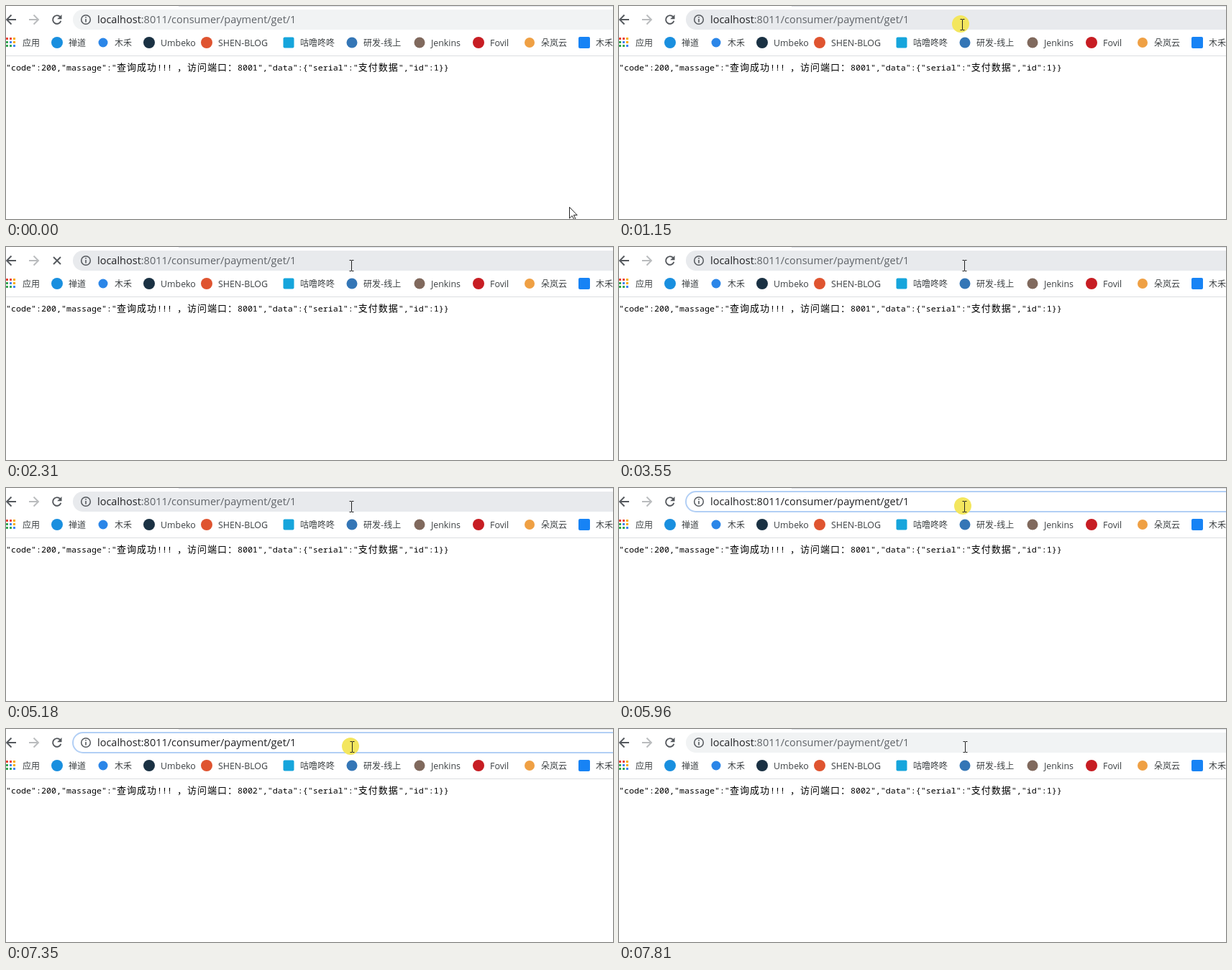
These frames come from a looping animation (844x297 px, 8 s). An HTML page:

```html
<!DOCTYPE html>
<html lang="zh-CN">
<head>
<meta charset="utf-8">
<style>
html, body { margin: 0; width: 844px; height: 297px; overflow: hidden; background: #fff; }
svg { display: block; }
text { white-space: pre; }
#url { font: 14.5px "Open Sans", "Noto Sans", sans-serif; fill: #202124; }
#marks text { font: 12px "Noto Sans CJK SC", "Noto Sans CJK", sans-serif; fill: #3c4043; }
#marks text.latin { font: 12.4px "Open Sans", "Noto Sans", sans-serif; }
#json { font: 11.667px "Noto Sans Mono", "Liberation Mono", monospace; }
#json .han { font: 13px "Noto Sans CJK SC", "Noto Sans CJK", sans-serif; letter-spacing: 1px; }
.line { fill: none; stroke: #54585d; stroke-width: 1.9; }
</style>
</head>
<body>
<svg width="844" height="297" viewBox="0 0 844 297">
  <rect x="240" width="604" height="1" fill="#dee1e6"/>
  <path class="line" d="M14 19H1M7.5 12.5L1 19l6.5 6.5"/>
  <path class="line" d="M32 19h13M38.500 12.500L45 19l-6.500 6.500" style="stroke:#babcbe"/>
  <g id="reload">
    <path class="line" d="M75.300 15.200A5.800 5.800 0 1 0 76.400 20.800"/>
    <path d="M77.500 12v6.300h-6.300z" fill="#54585d"/>
  </g>
  <path id="stop" class="line" d="M66 14l10 10M76 14l-10 10"/>

  <rect id="pill" x="93" y="5" width="780" height="28" rx="14" stroke-width="2"/>
  <circle class="line" cx="111" cy="19" r="6.300" style="stroke-width:1.500"/>
  <path d="M110.200 15h1.600v1.600h-1.600zM110.200 18h1.600v4.500h-1.600z" fill="#54585d"/>
  <rect id="selection" x="127" y="10" width="276" height="19" fill="#a8cbf8"/>
  <text id="url" x="127" y="24">localhost<tspan id="path">:8011/consumer/payment/get/1</tspan></text>

  <g id="marks"></g>
  <rect y="69" width="844" height="1" fill="#dcdee1"/>
  <text id="json" x="0" y="90">"code":200,"massage":"<tspan class="han">查询成功</tspan>!!! <tspan class="han">，访问端口：</tspan><tspan id="port">8001</tspan>","data":{"serial":"<tspan class="han">支付数据</tspan>","id":1}}</text>

  <circle id="press" r="12" fill="#f3e65e"/>
  <path id="arrow" d="M.5.500v15.500l3.700-3.500 2.600 5.200 2.100-1-2.500-5.100h4.800z" fill="#fff" stroke="#222"/>
  <path id="beam" d="M-3 -7.500h2.500l.5.500.500-.500H3M0 -7V7M-3 7.500h2.500l.5-.500.500.500H3" fill="none" stroke="#222"/>
</svg>
<script>
const LOOP = 8000;
const $ = id => document.getElementById(id);
const show = (id, on) => $(id).style.display = on ? '' : 'none';
const move = (id, x, y) => $(id).setAttribute('transform', `translate(${x} ${y})`);
const within = (t, spans) => spans.some(([a, b]) => t >= a && t < b);
const latest = (t, list) => list.filter(k => k[0] <= t).pop();

// Bookmarks: icon centre, half size, colour, label, square icon
const marks = [
  [71, 8, '#198fdf', '禅道'],
  [135, 6.5, '#2b86e8', '木禾'],
  [199, 8, '#1a3143', 'Umbeko'],
  [279, 8, '#df5430', 'SHEN-BLOG'],
  [393, 7.5, '#16a5dc', '咕噜咚咚', true],
  [481, 7.5, '#3476b6', '研发-线上'],
  [575, 7.5, '#80695d', 'Jenkins'],
  [657, 8, '#c71d23', 'Fovil'],
  [728, 7, '#efa044', '朵岚云'],
  [804, 8, '#1783f5', '木禾', true]
];
const appColors = ['#ea4335', '#ea4335', '#f9ab00', '#34a853', '#4285f4', '#f9ab00', '#34a853', '#34a853', '#4285f4'];

const apps = appColors.map((c, i) =>
  `<rect x="${i % 3 * 5}" y="${44 + Math.floor(i / 3) * 5}" width="3" height="3" fill="${c}"/>`).join('');
const label = (x, s) => `<text x="${x}" y="56"${/^[A-Z]/.test(s) ? ' class="latin"' : ''}>${s}</text>`;
const icon = (x, r, c, square) =>
  `<rect x="${x - r}" y="${51 - r}" width="${2 * r}" height="${2 * r}" rx="${square ? 2 : r}" fill="${c}"/>`;
$('marks').innerHTML = apps + label(23, '应用') +
  marks.map(([x, r, c, s, square]) => icon(x, r, c, square) + label(x + 16, s)).join('');

// Pointer positions over the address bar
const beamKeys = [
  [920, 479, 12], [990, 478, 9], [1070, 477, 21], [1150, 477, 26], [1530, 478, 26],
  [2160, 479, 26], [2310, 480, 26], [7130, 480, 25], [7200, 481, 25]
];
const pillKeys = [
  [0, 'idle'], [920, 'hover'], [1220, 'focus'], [2080, 'idle'], [2160, 'hover'],
  [5960, 'focus'], [6420, 'idle'], [7130, 'hover'], [7350, 'focus'], [7810, 'idle']
];
const pillFill = { idle: '#f1f3f4', hover: '#e8eaed', focus: '#fff' };

function arrowAt(t) {
  const step = t < 70 ? 0 : Math.min(11, Math.floor((t - 70) / 77) + 1);
  const u = step / 11, s = u * u * (3 - 2 * u);
  const bezier = (a, b, c) => Math.round((1 - s) ** 2 * a + 2 * s * (1 - s) * b + s * s * c);
  return [bezier(783, 870, 475), bezier(280, 150, 39)];
}

function draw(t) {
  const onBar = t >= 920;
  show('arrow', !onBar);
  show('beam', onBar);
  if (onBar) {
    const [, x, y] = latest(t, beamKeys);
    move('beam', x + .5, y);
    move('press', x - 2, y - 1);
  } else {
    move('arrow', ...arrowAt(t));
  }
  show('press', within(t, [[1150, 1300], [5960, 6120], [7350, 7500]]));
  show('selection', within(t, [[1300, 2080], [6120, 6420], [7500, 7810]]));

  const state = latest(t, pillKeys)[1], focused = state === 'focus';
  $('pill').setAttribute('fill', pillFill[state]);
  $('pill').setAttribute('stroke', focused ? '#b2cff5' : 'none');
  $('path').setAttribute('fill', focused ? '#202124' : '#5f6368');

  const loading = within(t, [[2080, 2390], [3470, 3550], [5110, 5180]]);
  show('stop', loading);
  show('reload', !loading);
  $('port').textContent = t < 6420 ? '8001' : '8002';
}

function tick() {
  draw(performance.now() % LOOP);
  requestAnimationFrame(tick);
}
tick();
</script>
</body>
</html>
```
